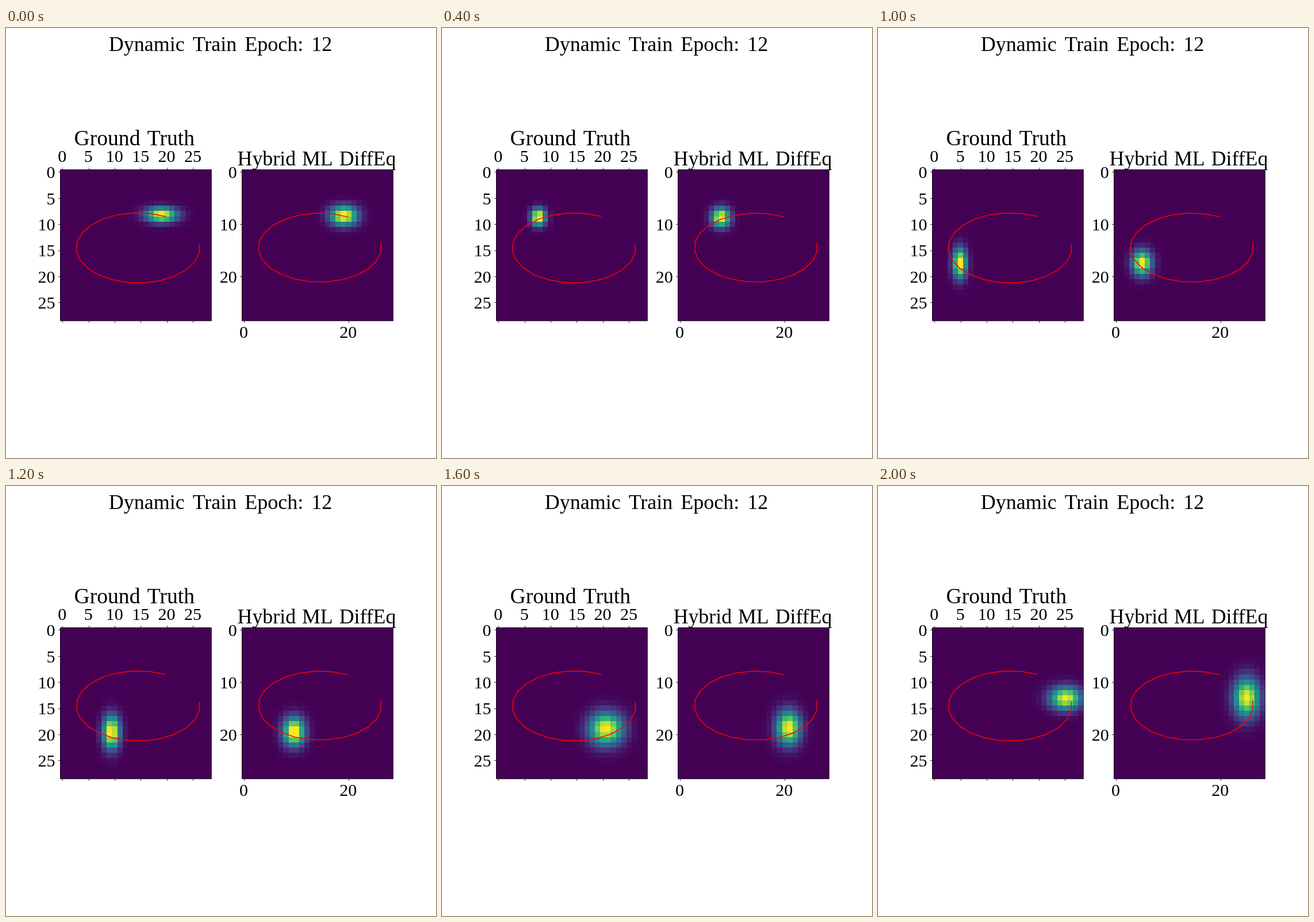
Write an HTML page with a canvas that moves like this. It is 748 by 748 pixels and loops after 2.1 s.

```html
<!DOCTYPE html>
<html lang="en">
<head>
<meta charset="utf-8">
<title>Dynamic Train Epoch</title>
<style>
html, body { margin: 0; width: 100%; height: 100%; overflow: hidden; background: #fff; }
canvas { display: block; }
</style>
</head>
<body>
<canvas id="stage" width="748" height="748"></canvas>
<script>
const ctx = document.getElementById('stage').getContext('2d');
const CELLS = 29, SIZE = 263.5, CELL = SIZE / CELLS, TOP = 245.8;
const STEPS = 21, STEP_MS = 100;
const VIRIDIS = ['440154', '472d7b', '3b528b', '2c728e', '21918c', '28ae80', '5ec962', 'addc30', 'fde725']
  .map(hex => [0, 2, 4].map(i => parseInt(hex.slice(i, i + 2), 16)));

// Steps at which the blob widths below are given
const KEYS = [0, 4, 8, 12, 14, 16, 20];

// path: ellipse in pixels; blob: ellipse in cells; angles in degrees
const panels = [
  {
    x: 93.6, start: -63.7, turn: -15.16,
    path: { cx: 229.7, cy: 382.5, rx: 107.5, ry: 61 },
    blob: { cx: 14, cy: 13.85, rx: 11.2, ry: 6.3 },
    sx: [2.05, 0.95, 0.87, 1.1, 1.9, 2.2, 2.05],
    sy: [0.95, 1.1, 1.7, 2.15, 2.2, 2.1, 1.5],
    left: [0, 5, 10, 15, 20, 25], top: [0, 5, 10, 15, 20, 25], bottom: []
  },
  {
    x: 409.8, start: -62.8, turn: -15.28,
    path: { cx: 546, cy: 382, rx: 107, ry: 60 },
    blob: { cx: 14, cy: 13.85, rx: 11.1, ry: 6.15 },
    sx: [1.8, 1.2, 1.2, 1.4, 1.5, 1.55, 1.7],
    sy: [1.25, 1.25, 1.4, 1.85, 2.15, 2.2, 2.55],
    left: [0, 10, 20], top: [], bottom: [0, 20]
  }
];

// Cubic interpolation through the keyed values
function smooth(values, step) {
  let i = 0;
  while (i < KEYS.length - 2 && step > KEYS[i + 1]) i++;
  const slope = k => {
    const a = Math.max(k - 1, 0), b = Math.min(k + 1, KEYS.length - 1);
    return (values[b] - values[a]) / (KEYS[b] - KEYS[a]);
  };
  const h = KEYS[i + 1] - KEYS[i], u = (step - KEYS[i]) / h, v = 1 - u;
  return v * v * (1 + 2 * u) * values[i] + u * u * (1 + 2 * v) * values[i + 1]
    + h * u * v * (v * slope(i) - u * slope(i + 1));
}

function viridis(value) {
  const pos = Math.min(Math.max(value, 0), 1) * (VIRIDIS.length - 1);
  const i = Math.min(Math.floor(pos), VIRIDIS.length - 2);
  const rgb = VIRIDIS[i].map((c, k) => Math.round(c + (VIRIDIS[i + 1][k] - c) * (pos - i)));
  return `rgb(${rgb})`;
}

function orbit(panel, ellipse, step) {
  const angle = (panel.start + panel.turn * step) * Math.PI / 180;
  return [ellipse.cx + ellipse.rx * Math.cos(angle), ellipse.cy + ellipse.ry * Math.sin(angle)];
}

function text(str, x, y, size, align = 'center', gap = 0) {
  ctx.font = `${size}px "Liberation Serif", "Times New Roman", serif`;
  ctx.wordSpacing = `${gap}px`;
  ctx.textAlign = align;
  ctx.fillStyle = '#000';
  ctx.fillText(str, x, y);
}

function line(points, color, width) {
  ctx.beginPath();
  points.forEach(p => ctx.lineTo(...p));
  ctx.strokeStyle = color;
  ctx.lineWidth = width;
  ctx.lineJoin = 'round';
  ctx.stroke();
}

function drawHeat(panel, step) {
  const [cx, cy] = orbit(panel, panel.blob, step);
  const bell = (center, sigma) =>
    Array.from({ length: CELLS }, (_, i) => Math.exp(-((i - center) ** 2) / (2 * sigma * sigma)));
  const cols = bell(cx, smooth(panel.sx, step)), rows = bell(cy, smooth(panel.sy, step));
  const peak = Math.max(...cols) * Math.max(...rows);
  const edge = (origin, i) => Math.round(origin + i * CELL);
  rows.forEach((r, j) => cols.forEach((c, i) => {
    const x = edge(panel.x, i), y = edge(TOP, j);
    ctx.fillStyle = viridis(r * c / peak);
    ctx.fillRect(x, y, edge(panel.x, i + 1) - x, edge(TOP, j + 1) - y);
  }));
}

function drawAxes(panel) {
  const snap = v => Math.round(v) + 0.5;
  const x = snap(panel.x), y = snap(TOP);
  const right = snap(panel.x + SIZE), base = snap(TOP + SIZE);
  const col = n => panel.x + (n + 0.5) * CELL, row = n => TOP + (n + 0.5) * CELL;
  const tick = (x1, y1, dx, dy) => line([[x1, y1], [x1 + dx, y1 + dy]], '#000', 0.8);
  ctx.strokeStyle = '#000';
  ctx.lineWidth = 0.8;
  ctx.strokeRect(x, y, right - x, base - y);
  panel.left.forEach(n => {
    tick(x, snap(row(n)), -3.5, 0);
    text(n, panel.x - 8, row(n) + 10.8, 30, 'right');
  });
  panel.top.forEach(n => {
    tick(snap(col(n)), y, 0, -3.5);
    tick(snap(col(n)), base, 0, 3.5);
    text(n, col(n) - 0.3, 233, 30);
  });
  panel.bottom.forEach(n => {
    tick(snap(col(n)), base, 0, 3.5);
    text(n, col(n) - 0.8, 539, 30);
  });
}

function draw(step) {
  ctx.fillStyle = '#fff';
  ctx.fillRect(0, 0, 748, 748);
  for (const panel of panels) {
    drawHeat(panel, step);
    line(Array.from({ length: STEPS }, (_, i) => orbit(panel, panel.path, i)), '#f00', 1.5);
    drawAxes(panel);
  }
  text('Dynamic Train Epoch: 12', 373, 40, 36, 'center', 5);
  text('Ground Truth', 223.3, 204, 37.6, 'center', 3);
  text('Hybrid ML DiffEq', 540.5, 239, 35.8, 'center', 2);
}

function frame() {
  draw(Math.floor(performance.now() / STEP_MS) % STEPS);
  requestAnimationFrame(frame);
}
frame();
</script>
</body>
</html>
```
